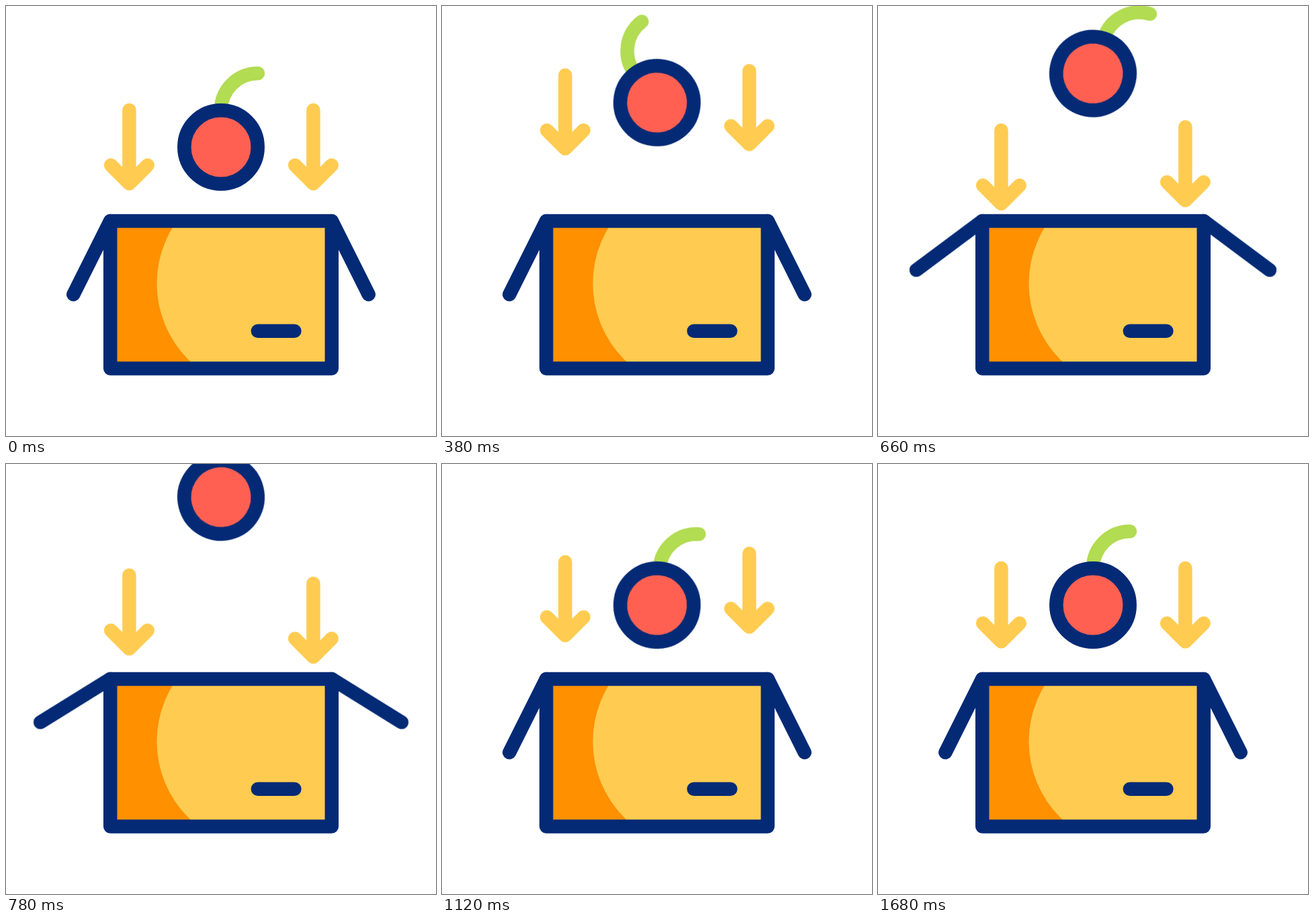
Recreate the animation shown at these times as an HTML page. Size 640 by 640 pixels, loop 1840 ms.

```html
<!DOCTYPE html>
<html lang="en">
<head>
<meta charset="utf-8">
<title>Cherry box</title>
<style>
  html, body { margin: 0; width: 100%; height: 100%; overflow: hidden; background: #fff; }
  svg { display: block; width: 100%; height: 100%; }

  .line { fill: none; stroke-width: 20.5; stroke-linecap: round; stroke-linejoin: round; }
  .navy { stroke: #042a76; }
  .yellow { stroke: #ffcc51; }
  .green { stroke: #b2dc51; }

  .move { animation: 1840ms cubic-bezier(.333, 0, .667, 1) infinite; }
  .arrow { animation-name: bob; }
  .late { animation-delay: 55ms; }
  .cherry { animation-name: jump; }
  .spin { animation-name: swing; transform-origin: 320px 210px; }
  .flap { animation-name: open; transform-origin: 155px 320px; }

  @keyframes bob {
    0%, 88.75%, 100% { transform: translateY(0); }
    17.77% { transform: translateY(-58.5px); }
    35.49% { transform: translateY(30px); }
    53.8% { transform: translateY(-30px); }
    70.1% { transform: translateY(21.3px); }
  }
  @keyframes jump {
    0%, 54.57%, 100% { transform: translateY(0); }
    19.95% { transform: translateY(-68px); }
    30.7% { transform: translateY(58.5px); }
    38.97% { transform: translateY(-184px); }
  }
  @keyframes swing {
    0%, 66.3%, 100% { transform: rotate(0deg); }
    19.95% { transform: rotate(-37.4deg); }
    42.4% { transform: rotate(31deg); }
  }
  @keyframes open {
    0%, 29.6%, 58.3%, 100% { transform: rotate(0deg); }
    38.8% { transform: rotate(34.8deg); }
  }
</style>
</head>
<body>
<svg viewBox="0 0 640 640">
  <defs>
    <clipPath id="front"><rect x="155" y="320" width="330" height="220"/></clipPath>
    <path id="arrow" d="M0 155V264M-27.3 237L0 264.3L27.3 237"/>
  </defs>

  <g class="move cherry">
    <g class="move spin">
      <path class="line green" d="M320 155A55 55 0 0 1 375 100.3"/>
      <circle class="line navy" cx="320" cy="210" r="54.7" style="fill:#ff6052"/>
    </g>
  </g>

  <g class="line yellow">
    <g class="move arrow"><use href="#arrow" x="183.4"/></g>
    <g class="move arrow late"><use href="#arrow" x="457.4"/></g>
  </g>

  <path class="line navy move flap" d="M155 320L100.3 429.3"/>
  <g transform="matrix(-1 0 0 1 640 0)">
    <path class="line navy move flap" d="M155 320L100.3 429.3"/>
  </g>

  <g clip-path="url(#front)">
    <rect x="155" y="320" width="330" height="220" fill="#ff9000"/>
    <circle cx="384.5" cy="413" r="160" fill="#ffcc51"/>
  </g>
  <rect class="line navy" x="155.2" y="320" width="329.6" height="219.6"/>
  <path class="line navy" d="M374.8 483.8H429.4"/>
</svg>
</body>
</html>
```
